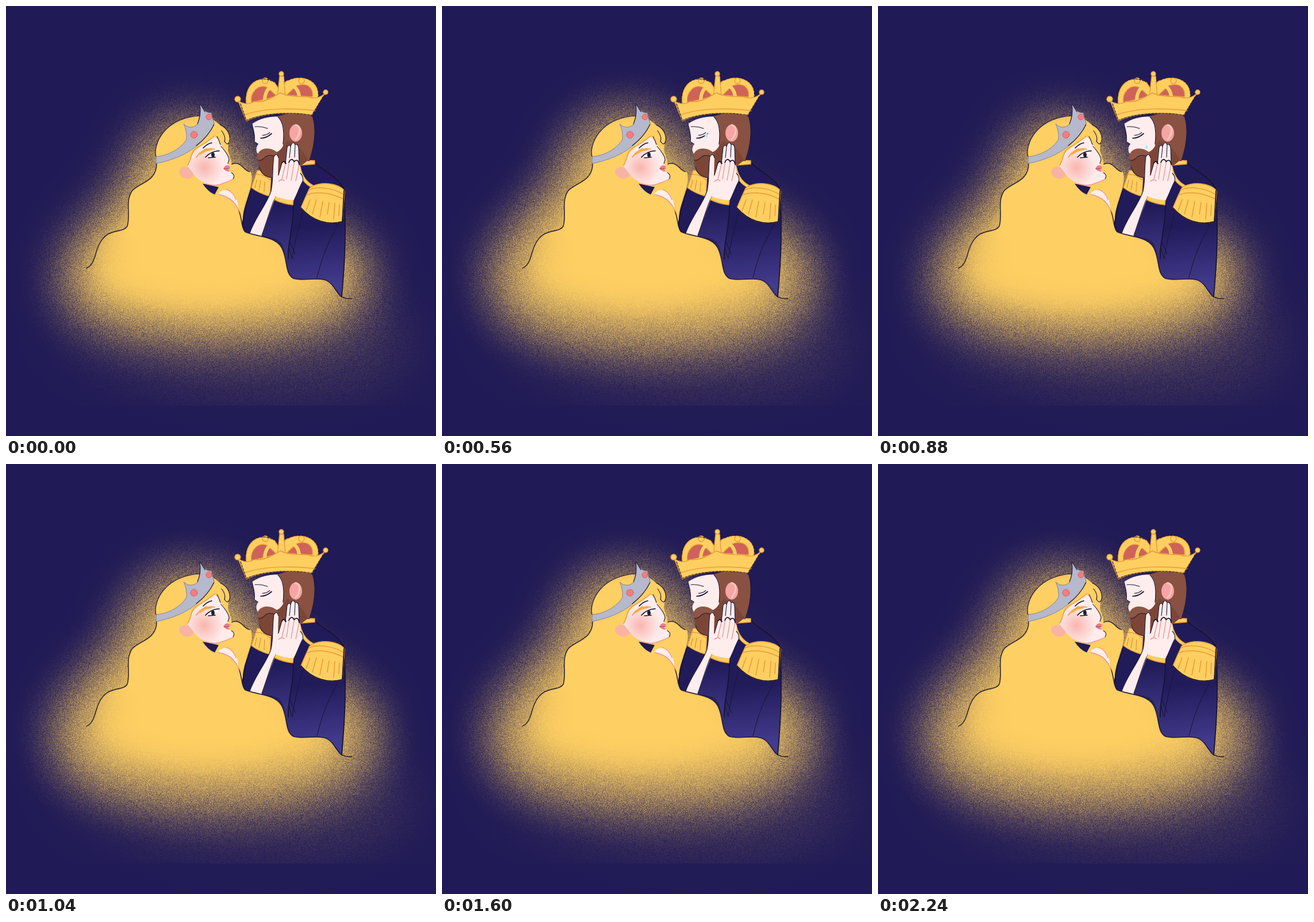
An HTML page with a canvas that plays this animation: 748 px wide and 748 px high, repeating every 2.56 s.

```html
<!DOCTYPE html>
<html lang="en">
<head>
<meta charset="utf-8">
<title>Royal farewell</title>
<style>
html, body { margin: 0; width: 100%; height: 100%; overflow: hidden; background: #201a56; }
canvas, svg { position: absolute; left: 0; top: 0; width: 100vw; height: 100vh; }
svg * { stroke-linecap: round; stroke-linejoin: round; }
.ink { fill: none; stroke: #17132e; stroke-width: 1.7; }
.thin { fill: none; stroke: #1c1738; stroke-width: 1.1; }
.gold { fill: #fecf60; stroke: #e79b3b; stroke-width: 1.4; }
.seam { fill: none; stroke: #e89a3a; stroke-width: 1.5; }
.skin { fill: #feedec; }
.pink { fill: none; stroke: #ef8f91; stroke-width: 1.3; }
</style>
</head>
<body>
<canvas id="dim" width="748" height="748"></canvas>
<canvas id="bright" width="748" height="748"></canvas>
<svg viewBox="0 0 748 748">
  <defs>
    <radialGradient id="hairFill" gradientUnits="userSpaceOnUse" cx="0" cy="0" r="1" gradientTransform="translate(335 325) scale(250 220)">
      <stop offset=".55" stop-color="#fecf62"/><stop offset="1" stop-color="#fecf62" stop-opacity="0"/>
    </radialGradient>
    <linearGradient id="coat" gradientUnits="userSpaceOnUse" x1="515" y1="385" x2="525" y2="490">
      <stop offset="0" stop-color="#211b5a"/><stop offset="1" stop-color="#433b8d"/>
    </linearGradient>
    <linearGradient id="sleeve" gradientUnits="userSpaceOnUse" x1="470" y1="350" x2="478" y2="420">
      <stop offset="0" stop-color="#211b5a"/><stop offset="1" stop-color="#39327c"/>
    </linearGradient>
    <radialGradient id="blush" gradientUnits="userSpaceOnUse" cx="345" cy="281" r="34">
      <stop offset="0" stop-color="#f9b5ae"/><stop offset="1" stop-color="#feecec"/>
    </radialGradient>
  </defs>

  <!-- king: coat, its hem following the wave of hair -->
  <path fill="url(#coat)" d="M508 272 L537 272 C550 287 580 298 588 319 C592 390 590 440 584 506 C574 500 570 480 553 476 C537 472 519 479 500 474 C486 466 490 447 482 426 C474 400 440 403 416 393 C409 386 411 375 412 370 C413 350 422 330 436 296 L470 295Z"/>
  <path fill="url(#sleeve)" d="M468 336 L500 345 C500 385 490 415 489 445 C485 436 486 412 470 405 Q456 402 444 400 C450 370 458 350 468 336Z"/>
  <path class="ink" d="M537 272 C550 287 580 298 588 319 C592 390 590 440 584 506 M411 388 C412 365 422 325 433 302 M500 346 C501 380 489 415 491 440 M468 339 C457 354 449 378 445 400"/>
  <path class="thin" d="M516 358 C509 390 501 410 498 440 M578 377 C570 400 556 410 541 473 M493 408 L503 432 M492 420 L497 438"/>
  <path class="gold" d="M512 268 L537 269 L537 275 L512 277Z"/>
  <path d="M510 281 C514 302 526 312 540 317" fill="none" stroke="#e79b3b" stroke-width="6"/>
  <path d="M510 281 C514 302 526 312 540 317" fill="none" stroke="#fecf60" stroke-width="3.6"/>
  <path class="gold" d="M528 317 C543 304 580 307 589 322 L585 375 C560 382 533 374 513 351 Q520 334 528 317Z"/>
  <path class="seam" d="M527 320 C542 312 575 318 588 329 M524 328 C545 321 570 327 587 336 M529 337 L522 356 M540 337 L533 362 M551 340 L546 367 M562 342 L559 362 M572 343 L570 371 M580 346 L579 365"/>
  <path class="ink" d="M513 351 C533 374 560 382 585 375 L588 321"/>
  <path class="gold" d="M437 286 Q451 286 461 295 L459 331 Q440 326 427 316Z"/>
  <path class="seam" d="M435 293 Q449 292 460 303 M436 303 L433 316 M443 303 L440 320 M450 306 L449 323"/>

  <!-- king: head -->
  <path class="skin" d="M428 205 C445 193 470 190 486 194 L490 248 L460 262 L438 257 C434 251 435 246 439 240 L432 237 C434 224 430 215 428 205Z"/>
  <path class="thin" d="M428 205 C430 215 434 224 432 236 L438 240"/>
  <path fill="#885142" d="M473 192 C500 182 525 184 534 194 C540 215 537 243 528 270 L509 270 L494 246 C483 252 481 244 482 237 C484 218 484 203 473 192Z"/>
  <path class="thin" d="M473 193 C484 203 484 222 482 240 M534 194 C540 215 537 243 528 268"/>
  <path fill="#7c4637" d="M437 264 C437 246 459 244 471 254 C481 250 482 240 490 234 L514 250 L526 268 L495 292 C475 304 446 303 441 282Z"/>
  <path fill="#8e5644" d="M437 267 C436 245 461 243 474 258 C464 264 459 257 452 262 Q444 268 437 267Z"/>
  <path class="thin" d="M440 269 Q446 269 452 262 Q460 257 470 263 M441 280 C443 292 453 298 466 299"/>
  <ellipse cx="504" cy="221" rx="11" ry="15" fill="#f5a5a3"/>
  <path d="M504 207 C515 210 511 224 504 232" fill="none" stroke="#fbc5bd" stroke-width="3"/>
  <path class="thin" d="M433 210 Q444 209 455 213"/>
  <path class="ink" d="M443 230 Q453 230 462 222"/>
  <path class="thin" d="M446 225 Q453 225 459 220"/>

  <!-- king: crown -->
  <g class="gold">
    <path d="M419 174 C411 139 440 115 467 133 L477 148 L486 132 C511 117 548 126 543 163Z"/>
    <path fill="#cf6259" d="M427 168 C424 150 440 134 455 142 L471 157Z"/>
    <path fill="#cf6259" d="M488 155 L505 139 C525 132 535 143 533 158Z"/>
  </g>
  <path d="M450 166 Q450 145 464 139 M510 157 Q508 142 496 137" fill="none" stroke="#fecf60" stroke-width="6"/>
  <g class="gold">
    <path d="M476 122 L483 122 L486 158 L472 158Z"/>
    <path d="M404 165 C415 172 424 171 432 166 C448 169 464 159 477 151 C493 159 511 157 525 158 Q540 164 554 153 L532 190 C505 185 453 183 418 200Z"/>
    <circle cx="403" cy="162" r="5"/><circle cx="556" cy="150" r="4"/><circle cx="479" cy="118" r="4"/>
    <circle cx="451" cy="130" r="5"/><circle cx="514" cy="130" r="5"/>
  </g>
  <path class="seam" d="M416 189 C453 176 505 178 538 182"/>
  <path class="thin" stroke-dasharray="4 2" d="M417 157 C419 132 441 119 466 132 M491 129 C515 116 548 130 543 158 M408 170 L418 199 C453 184 505 185 532 190 L552 157"/>

  <!-- queen: hair -->
  <path fill="url(#hairFill)" d="M262 272 C254 238 278 194 338 191 C365 192 392 220 386 250 L393 275 C409 269 413 286 426 289 C434 312 409 344 411 380 Q412 391 417 394 C440 403 474 400 482 426 C490 447 486 466 500 474 C519 479 537 472 553 476 C570 480 574 500 584 506 L602 509 L550 560 L110 560 L138 456 C153 450 154 433 160 417 C175 383 203 399 211 383 C217 362 206 341 219 322 C233 306 263 307 262 272Z"/>
  <path class="ink" d="M262 274 C262 306 232 307 219 322 C207 341 217 362 211 383 C203 397 176 383 161 417 C154 433 154 450 140 456 M393 275 C409 269 413 286 423 288 M405 356 C411 370 409 386 416 393 C440 403 474 400 482 426 C490 447 486 466 500 474 C519 479 537 472 553 476 C570 480 574 500 584 506 Q592 510 602 509" stroke-opacity=".85"/>
  <path class="thin" d="M261 262 C255 238 278 194 338 191"/>

  <!-- queen: neck and face -->
  <path fill="#211a55" d="M342 309 L370 315 L363 328 Q351 323 342 309Z"/>
  <path class="skin" d="M369 328 C374 316 391 318 399 333 Q405 343 404 354 C397 337 385 330 369 328Z"/>
  <path class="pink" d="M370 328 C386 331 398 338 406 358 M384 319 Q395 323 400 337"/>
  <ellipse cx="314" cy="290" rx="13" ry="10" fill="#f8b3a4" transform="rotate(18 314 290)"/>
  <path fill="url(#blush)" d="M322 259 L363 220 C369 233 373 241 380 250 C384 257 388 262 388 268 L386 275 L391 280 L388 284 L391 289 C398 292 398 297 395 301 C387 306 377 308 370 311 C352 313 335 304 328 294 L316 279Z"/>
  <path class="thin" d="M374 244 C382 253 388 262 388 268 L386 274 M392 290 C398 293 397 298 395 301"/>
  <path class="pink" d="M395 301 C387 306 378 308 370 311 Q360 313 347 309"/>
  <path fill="#ee7d86" d="M378 283 Q381 276 386 277 L391 280 L386 284 L390 287 Q385 290 378 283Z"/>
  <path d="M379 283 L389 283" stroke="#a33e54"/>
  <path fill="#fff" d="M349 263 Q357 252 370 254 Q364 265 349 263Z"/>
  <ellipse cx="360" cy="259" rx="3" ry="4" fill="#241b34"/>
  <path class="ink" d="M347 263 Q358 252 371 252 M352 264 L364 263"/>
  <path fill="#fecf62" d="M290 265 C325 252 347 235 361 206 C377 203 393 220 388 238 Q383 243 380 235 Q379 242 373 241 Q371 231 362 227 C352 235 342 242 330 249 C320 256 324 267 316 278 C311 276 312 270 305 270Z"/>
  <path class="seam" d="M363 226 Q349 238 330 248 C321 255 323 267 316 277 M344 253 Q355 247 363 249 M331 263 Q337 254 349 248"/>
  <path class="seam" d="M337 257 L347 251 L357 249" style="stroke:#f8ac42;stroke-width:4"/>
  <path class="ink" d="M343 247 Q351 239 358 238"/>
  <path class="thin" d="M373 207 C388 214 393 230 387 239 Q384 242 380 235 M375 217 Q383 227 380 236 M367 227 Q371 234 373 241"/>

  <!-- queen: tiara -->
  <path fill="#b6b8cb" stroke="#85839d" d="M262 262 C285 260 306 246 314 232 Q315 217 309 205 C317 213 326 212 333 206 C338 194 339 183 337 169 C343 180 348 187 357 186 Q359 196 362 204 C350 232 320 263 261 274Z"/>
  <path class="thin" d="M333 205 C338 194 339 183 337 169 L346 184 M362 206 C356 219 344 233 331 243"/>
  <g fill="#f27e7d" stroke="#d86169"><circle cx="327" cy="224" r="6"/><circle cx="353" cy="193" r="5"/></g>

  <!-- clasped hands -->
  <path class="skin" d="M424 395 C434 367 454 344 461 322 C465 306 463 284 466 262 Q471 254 474 264 L473 297 L469 334 C461 352 453 377 445 400Z"/>
  <path class="thin" d="M424 395 C434 367 454 344 461 322 C465 306 463 284 466 262 Q471 254 474 264 M467 336 C460 352 453 377 445 399"/>
  <path class="gold" d="M470 329 Q485 335 500 337 L499 346 Q481 344 467 337Z"/>
  <path class="skin" d="M469 331 C467 315 470 302 474 294 L480 273 Q484 268 486 275 L489 246 Q493 239 495 245 Q498 233 503 241 Q508 239 509 247 L510 274 Q513 279 512 291 Q518 297 516 305 C511 314 507 326 501 338 Q483 337 469 331Z"/>
  <path class="thin" d="M474 294 L480 273 Q484 268 486 275 L489 246 Q493 239 495 245 L493 264 M495 245 Q498 233 503 241 L502 263 M503 241 Q508 239 509 247 L510 274 M512 291 Q518 297 516 305 C511 314 507 326 501 338"/>
  <path class="pink" d="M486 275 L480 301 M493 268 L488 301 M502 268 L496 303 M510 276 L504 304 M474 305 Q479 300 484 304"/>
  <path class="ink" d="M480 273 Q484 267 487 274 M492 272 Q496 263 501 270 M501 271 Q508 264 510 276"/>

  <g id="tear">
    <path id="trail" fill="none" stroke="#d8f0fc" stroke-width="2"/>
    <path id="drop" fill="#b9e4fa" stroke="#eefaff" d="M0 -6 C1 -2 4 0 3 3 Q0 7 -3 3 C-4 0 -1 -2 0 -6Z"/>
  </g>
</svg>
<script>
const $ = id => document.getElementById(id);
const SIZE = 748, STEP = 80, LOOP = 2560;

// Blurred glow with a fine spray-paint grain
function paintGlow(canvas, grow, seed) {
  const ctx = canvas.getContext('2d');
  ctx.filter = 'blur(43px)';
  ctx.fillStyle = ctx.strokeStyle = '#fff';
  ctx.lineWidth = grow * 2;
  ctx.lineJoin = 'round';
  const shape = new Path2D('M300 207 Q365 200 400 250 L435 310 L560 395 Q632 430 626 486 Q600 535 530 553 Q380 590 230 558 Q125 540 103 488 Q102 440 150 390 Q205 345 232 275 Q255 220 300 207Z');
  ctx.fill(shape);
  if (grow) ctx.stroke(shape);
  // faint outer haze
  ctx.filter = 'blur(48px)';
  ctx.globalAlpha = .14;
  ctx.beginPath();
  ctx.ellipse(400, 560, 300, 115, .1, 0, 7);
  ctx.fill();

  const img = ctx.getImageData(0, 0, SIZE, SIZE), px = img.data;
  const random = () => (seed = (Math.imul(seed, 1664525) + 1013904223) >>> 0) / 4294967296;
  const base = [32, 26, 86], light = [254, 207, 98];
  for (let i = 0; i < px.length; i += 4) {
    let a = px[i + 3] / 255;
    if (i / 4 / SIZE > 695) a *= .25;
    const grain = (random() + random() - 1) * 1.1 * a * (1 - a);
    const v = Math.max(0, Math.min(1, a + grain));
    for (let c = 0; c < 3; c++) px[i + c] = base[c] + (light[c] - base[c]) * v;
    px[i + 3] = 255;
  }
  ctx.putImageData(img, 0, 0);
}

function draw(now) {
  const step = Math.floor(now % LOOP / STEP);
  $('bright').style.visibility = step % 8 < 4 ? 'hidden' : 'visible';

  // The tear wells up, rolls down the cheek and vanishes into the beard
  const swell = Math.min(1, step / 7), fall = Math.max(0, step - 7) / 5;
  const x = 460 + 8 * Math.min(1, fall * 1.15), y = 225 + 24 * fall;
  $('tear').style.visibility = step > 0 && step < 13 ? 'visible' : 'hidden';
  $('drop').setAttribute('transform', `translate(${x} ${y}) scale(${swell * .85})`);
  $('trail').setAttribute('d', fall ? `M${x - 2} ${y - 8}L${x} ${y}` : '');
  requestAnimationFrame(draw);
}

paintGlow($('dim'), 0, 7);
paintGlow($('bright'), 9, 19);
requestAnimationFrame(draw);
</script>
</body>
</html>
```
